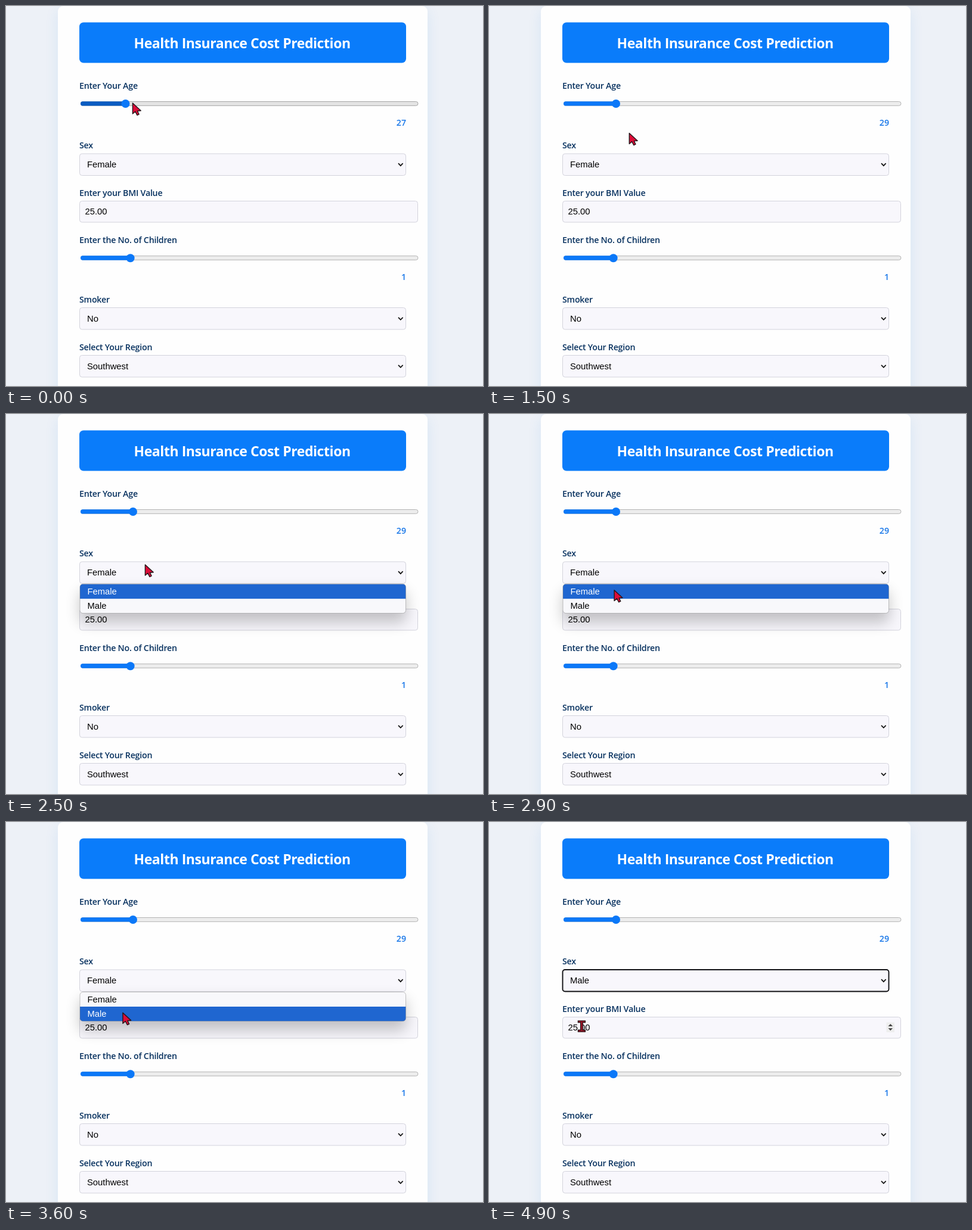
These frames come from a looping animation (800 px wide and 638 px high, 5000 ms). An HTML page:

```html
<!DOCTYPE html>
<html lang="en">
<head>
<meta charset="utf-8">
<title>Health Insurance Cost Prediction</title>
<style>
  html, body { margin: 0; width: 100%; height: 100%; overflow: hidden; background: #edf1f7; }
  svg { display: block; width: 800px; height: 638px; }
  .title { font: 700 23px "Open Sans", "Noto Sans", sans-serif; letter-spacing: -.43px; fill: #fff; }
  .label, .value { font: 600 14.2px "Open Sans", "Noto Sans", sans-serif; }
  .label { letter-spacing: -.23px; fill: #07315f; }
  .value { text-anchor: end; fill: #1676e8; }
  .field { font: 14.8px "Liberation Sans", Arial, sans-serif; fill: #000; }
  .box { fill: #f8f7fc; stroke: #d3d3dc; }
  .chevron { fill: none; stroke: #111; stroke-width: 1.7; }
  .track { fill: #ededed; stroke: #b4b4b4; }
  .bar, .thumb { fill: #0b78f8; }
  .hover .track { fill: #e4e4e4; stroke: #a6a6a6; }
  .hover .bar, .over .thumb { fill: #0a5cc2; }
  .pick { fill: #1f66d0; }
  .field.on { fill: #fff; }
</style>
</head>
<body>
<svg viewBox="0 0 800 638">
  <defs>
    <filter id="soft" x="-20%" y="-20%" width="140%" height="140%"><feGaussianBlur stdDeviation="12"/></filter>
    <filter id="drop" x="-20%" y="-150%" width="140%" height="400%"><feGaussianBlur stdDeviation="12"/></filter>
    <path id="chev" class="chevron" d="M-3.8-2 0 2 3.8-2"/>
    <clipPath id="menuClip"><rect x="124" y="285.5" width="546.5" height="49" rx="5"/></clipPath>
  </defs>

  <rect width="800" height="638" fill="#edf1f7"/>
  <rect x="87" y="6" width="620" height="760" rx="10" fill="#0a6cd8" opacity=".09" filter="url(#soft)"/>
  <rect x="87" y="0" width="620" height="700" rx="9" fill="#fefefe"/>

  <rect x="123" y="27.5" width="548" height="68" rx="7" fill="#0a7cfa"/>
  <text class="title" x="214.5" y="71">Health Insurance Cost Prediction</text>

  <text class="label" x="123" y="139">Enter Your Age</text>
  <g id="age">
    <rect class="track" x="125.5" y="160.5" width="565.5" height="6.8" rx="3.4"/>
    <rect class="bar" id="ageBar" x="125" y="160.2" width="76" height="7.4" rx="3.7"/>
    <circle class="thumb" id="ageThumb" cx="200.5" cy="164" r="7"/>
  </g>
  <text class="value" id="ageValue" x="671" y="201">27</text>

  <text class="label" x="123" y="239">Sex</text>
  <rect class="box" id="sexBox" x="123.5" y="248" width="547" height="36.5" rx="4"/>
  <text class="field" id="sexText" x="136" y="271">Female</text>
  <use href="#chev" x="661.8" y="266.2"/>

  <text class="label" x="123" y="319">Enter your BMI Value</text>
  <rect class="box" x="123.5" y="327.5" width="567" height="35.5" rx="4"/>
  <text class="field" x="132.5" y="350">25.00</text>
  <g id="spin">
    <rect x="666.5" y="336.5" width="13.5" height="16.5" fill="#eeeeee"/>
    <path d="M669.5 343h7.6l-3.8-4zM669.5 346.3h7.6l-3.8 4z" fill="#454545"/>
  </g>

  <text class="label" x="123" y="398">Enter the No. of Children</text>
  <rect class="track" x="125.5" y="419.6" width="565.5" height="6.8" rx="3.4"/>
  <rect class="bar" x="125" y="419.3" width="84" height="7.4" rx="3.7"/>
  <circle class="thumb" cx="208.6" cy="423.2" r="7"/>
  <text class="value" x="671" y="460">1</text>

  <text class="label" x="123" y="498">Smoker</text>
  <rect class="box" x="123.5" y="506.5" width="547" height="36.5" rx="4"/>
  <text class="field" x="136" y="530">No</text>
  <use href="#chev" x="661.8" y="524.8"/>

  <text class="label" x="123" y="578">Select Your Region</text>
  <rect class="box" x="123.5" y="586.5" width="547" height="36.5" rx="4"/>
  <text class="field" x="136" y="610">Southwest</text>
  <use href="#chev" x="661.8" y="604.8"/>

  <g id="menu">
    <rect x="124" y="298" width="547" height="52" rx="5" opacity=".22" filter="url(#drop)"/>
    <rect x="124" y="285.5" width="546.5" height="49" rx="5" fill="#f8f8fb"/>
    <rect class="pick" id="pick" x="124" y="285.5" width="547" height="24.7" clip-path="url(#menuClip)"/>
    <rect x="124" y="285.5" width="546.5" height="49" rx="5" fill="none" stroke="#777" stroke-opacity=".55" stroke-width=".8"/>
    <text class="field" id="optFemale" x="136.5" y="303">Female</text>
    <text class="field" id="optMale" x="136.5" y="327">Male</text>
  </g>

  <path id="arrow" d="M0 0V18L4.4 14.2 7.6 20.3 10.7 18.8 8 13.2 13.8 12.8Z"
        fill="#dd0d38" stroke="#25171b" stroke-width="1.4" stroke-linejoin="round"/>
  <path id="beam" d="M-6-9.2H6V-6.4H1.8V6.4H6V9.2H-6V6.4H-1.8V-6.4H-6Z"
        fill="#a5152a" stroke="#211416" stroke-width="1.3"/>
</svg>
<script>
  const $ = id => document.getElementById(id);
  const LOOP = 5000, STEP = 100;
  const SET_AGE = 300, OPEN = 2500, CLOSE = 3700;

  // pointer path: time, x, y
  const path = [
    [0, 212, 163], [300, 212, 163], [800, 221, 166], [1000, 222, 167],
    [1700, 240, 232], [2100, 241, 245], [2500, 233, 253], [3100, 198, 317],
    [3700, 195, 321], [4200, 172, 341], [4900, 155, 343]
  ];

  function pointer(t) {
    let i = 1;
    while (i < path.length - 1 && path[i][0] < t) i++;
    const [t0, x0, y0] = path[i - 1], [t1, x1, y1] = path[i];
    const k = Math.min(1, (t - t0) / (t1 - t0));
    return [x0 + (x1 - x0) * k, y0 + (y1 - y0) * k];
  }

  const show = (id, on) => $(id).style.display = on ? "" : "none";

  function draw(t) {
    const [x, y] = pointer(t);
    const set = t >= SET_AGE, open = t >= OPEN && t < CLOSE, done = t >= CLOSE;

    const thumb = set ? 213 : 200.5;
    $("ageThumb").setAttribute("cx", thumb);
    $("ageBar").setAttribute("width", thumb - 125);
    $("ageValue").textContent = set ? 29 : 27;
    const hover = y < 172;
    $("age").classList.toggle("hover", hover);
    $("age").classList.toggle("over", hover && set);

    show("menu", open);
    const male = y >= 310;
    $("pick").setAttribute("y", male ? 310 : 285.5);
    $("optFemale").classList.toggle("on", !male);
    $("optMale").classList.toggle("on", male);

    $("sexText").textContent = done ? "Male" : "Female";
    $("sexBox").style.cssText = done ? "stroke:#101014;stroke-width:1.9" : "";

    const inInput = done && y >= 328;
    show("spin", inInput);
    show("arrow", !inInput);
    show("beam", inInput);
    $(inInput ? "beam" : "arrow").setAttribute("transform", `translate(${x + .4} ${y})`);
  }

  const start = performance.now();
  function tick() {
    const t = (performance.now() - start) % LOOP;
    draw(Math.floor(t / STEP) * STEP);
    requestAnimationFrame(tick);
  }
  tick();
</script>
</body>
</html>
```
